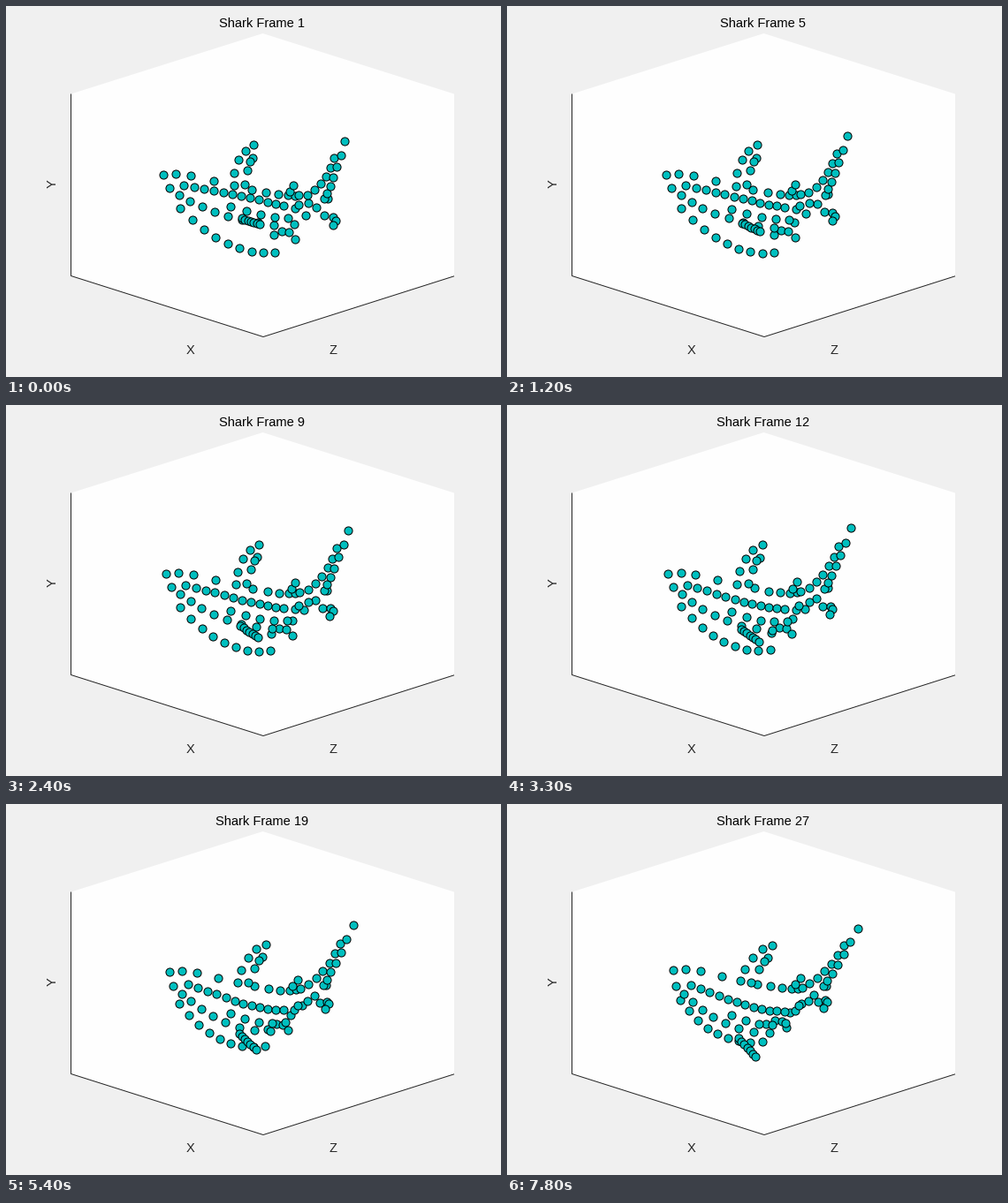
Write a matplotlib script that moves like this. It is 560 px wide and 420 px high and loops after 8000 ms.

```python
import numpy as np
import matplotlib.pyplot as plt
from matplotlib.animation import FuncAnimation

W, H, DPI = 560, 420, 100
PX = 72 / DPI                     # one pixel in points
STEPS, TICKS_PER_STEP = 27, 3     # poses per loop, ticks each pose stays
TICK, TICKS = 100, 80


# Vertical travel of each body layer: (whole shift, early speed) at x.
def late_then_early(x):
    return -.36 + .05 * np.maximum(x - 300, 0)


def back(x):
    return -2.5 - 4.5 * ((x - 179) / 163) ** 2, late_then_early(x)


def dorsal(x):
    return .2 * (x - 268), .5


def flank(x):
    w = np.clip((x - 186) / 155, 0, 1)
    return 13 * np.sin(np.pi * w ** 1.4), 1.73


def under(x):
    return -7 - .03 * (x - 198), late_then_early(x)


def fin(x):
    return 25 + .7 * (x - 268), 1.45


def lobe(x):
    return -13 - .45 * (x - 361), 1.97


# The shark is a set of dotted curves: layer, number of dots, key points.
CURVES = [
    (under, 9, [(198, 229), (251.5, 269), (305, 279)]),    # belly
    (under, 4, [(304, 259.5), (316.5, 255), (328, 264)]),
    (under, 4, [(327, 247), (364.5, 218)]),                # tail root
    (flank, 12, [(202, 203), (262, 214), (314.5, 226)]),
    (flank, 9, [(186, 206), (236.5, 233), (304, 248)]),
    (flank, 5, [(255, 227.5), (289, 236), (320, 240.5)]),
    (flank, 3, [(328, 229), (331.5, 225), (343, 223)]),
    (back, 2, [(179, 191), (193, 190)]),                   # snout
    (back, 9, [(210, 192), (295, 211), (332, 214)]),
    (back, 2, [(322, 210), (326, 203)]),
    (dorsal, 4, [(281, 157), (267.5, 168.5), (259, 189)]),
    (dorsal, 4, [(280, 172), (275.5, 180), (270.5, 202)]),
    (fin, 7, [(267.5, 240.5), (288, 247)]),
    (under, 6, [(342, 214), (360, 197), (372, 172)]),      # tail fin
    (under, 7, [(361, 218), (371, 194), (384, 153.5)]),
    (lobe, 4, [(361, 237), (373, 241), (370.5, 248)]),
]


def dotted(count, keys):
    """Evenly timed dots on the polynomial through the key points."""
    degree = len(keys) - 1
    curve = np.polyfit(np.linspace(0, 1, len(keys)), np.array(keys), degree)
    return (np.vander(np.linspace(0, 1, count), degree + 1) @ curve).T


def move(layer, x, y, s):
    """Lean the body sideways and shift its layer up or down, s from 0 to 1."""
    lean = 5.5 - .29 * (y - 206) - .12 * np.maximum(x - 325, 0)
    shift, early = layer(x)
    return x + lean * s, y + shift * (early * s + (1 - early) * s * s)


SHARK = [(layer, *dotted(count, keys)) for layer, count, keys in CURVES]


def pose(step):
    s = step / (STEPS - 1)
    return np.hstack([move(*part, s) for part in SHARK]).T - (1.2, .5)


plt.rcParams["font.family"] = "Liberation Sans"
fig = plt.figure(figsize=(W / 100, H / 100), dpi=DPI, facecolor="#f0f0f0")
ax = fig.add_axes([0, 0, 1, 1])
ax.set(xlim=(-.5, W - .5), ylim=(H - .5, -.5))
ax.axis("off")


def label(x, y, text, color="#262626", **kw):
    style = dict(ha="center", va="baseline", fontsize=14.67 * PX, color=color)
    return ax.text(x, y, text, **{**style, **kw})


ax.fill([73, 290, 506.5, 506.5, 290.5, 73], [99, 30.5, 99, 305.3, 374, 305],
        color="#fefefe", lw=0)
ax.plot([73, 73, 290.5, 506.5], [99, 305, 374, 305.3], color="#262626",
        lw=PX, solid_capstyle="butt")
label(208, 394, "X")
label(369.5, 394, "Z")
label(52.5, 201, "Y", rotation=90, va="center")
title = label(289, 24, "", color="black")
dots = ax.scatter(*pose(0).T, s=(9.1 * PX) ** 2, facecolor=(0, .75, .75),
                  edgecolor="black", linewidth=PX, zorder=3)


def update(tick):
    step = tick // TICKS_PER_STEP
    title.set_text(f"Shark Frame {step + 1}")
    dots.set_offsets(pose(step))
    return title, dots


anim = FuncAnimation(fig, update, frames=TICKS, interval=TICK, repeat=True,
                     repeat_delay=0)
plt.show()
```
